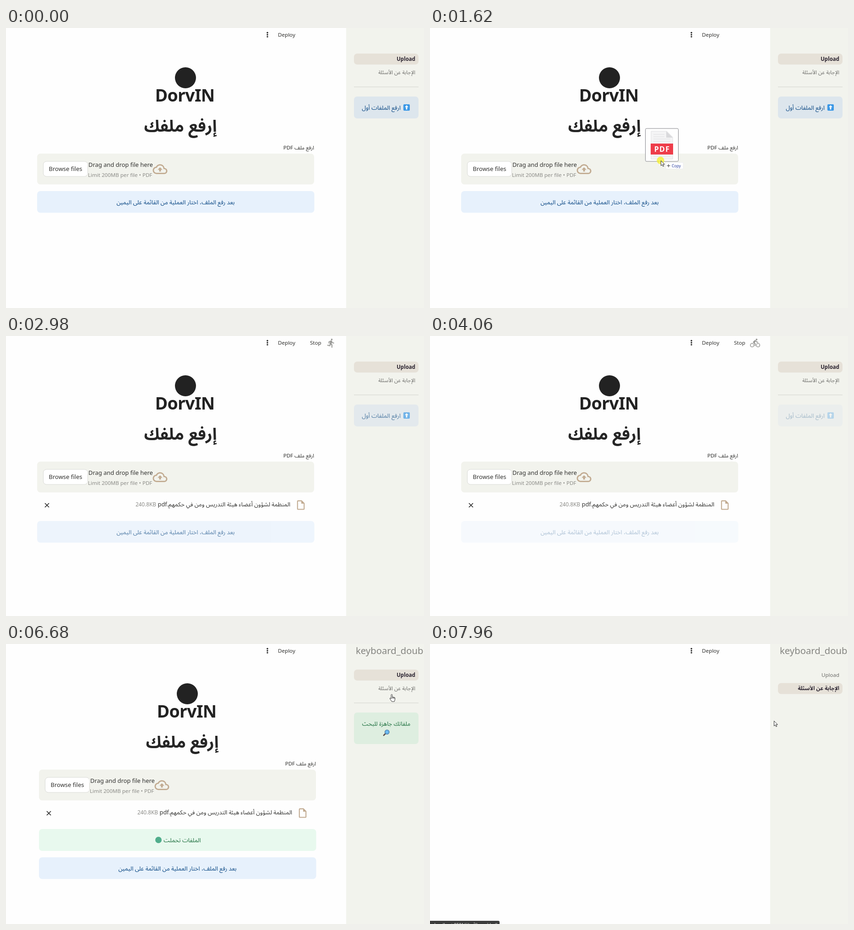
Recreate the animation shown at these times as an HTML page. Size 913 by 613 pixels, loop 8000 ms.

```html
<!DOCTYPE html>
<html lang="ar">
<head>
<meta charset="utf-8">
<title>Upload</title>
<style>
html, body { margin: 0; width: 100%; height: 100%; overflow: hidden; background: #fefefe; }
svg.stage { display: block; width: 913px; height: 613px; }
text { font-family: "Noto Sans", "Noto Sans Arabic", "Open Sans", "DejaVu Sans", sans-serif; font-size: 13px; fill: #31312f; }
.ar { direction: rtl; font-family: "Noto Sans Arabic", "Noto Sans", "DejaVu Sans", sans-serif; font-size: 12.85px; }
.mid { text-anchor: middle; }
.blue { fill: #0b4884; }
.green { fill: #1c6e3d; }
.grey { fill: #8b8b87; }
.tan { fill: #c1aa90; }

/* Every part shares one 8 s clock */
.t { animation: 8s step-end infinite; }
.drag { animation-name: drag; }
.tail { animation-name: tail; }
.page { animation-name: page; }
.file { animation-name: file; }
.info { animation-name: info; }
.stale { animation: stale 8s linear infinite; }
.run { animation-name: run; }
.walker { animation-name: walker; }
.runner { animation-name: runner; }
.biker { animation-name: biker; }
.done { animation-name: done; }
.side-old { animation-name: side-old; }
.side-new { animation-name: side-new; }
.tab-old { animation-name: tab-old; }
.tab-new { animation-name: tab-new; }
.collapse { animation-name: collapse; }
.arrow { animation-name: arrow; }
.hand { animation-name: hand; }
.status { animation-name: status; }

@keyframes drag {
  0% { visibility: hidden; transform: translate(880px, 131px); }
  13.25% { visibility: visible; transform: translate(880px, 131px); }
  14.125% { visibility: visible; transform: translate(805px, 127px); }
  15% { visibility: visible; transform: translate(728px, 134px); }
  15.875% { visibility: visible; transform: translate(680px, 145px); }
  16.75% { visibility: visible; transform: translate(635px, 160px); }
  17.625% { visibility: visible; transform: translate(588px, 187px); }
  18.5% { visibility: visible; transform: translate(557px, 222px); }
  19.375% { visibility: visible; transform: translate(526px, 260px); }
  20.25% { visibility: visible; transform: translate(504px, 290px); }
  21.125% { visibility: visible; transform: translate(496px, 304px); }
  22% { visibility: visible; transform: translate(490px, 314px); }
  22.75% { visibility: visible; transform: translate(487px, 320px); }
  23.625%, 100% { visibility: hidden; transform: translate(487px, 320px); }
}
@keyframes tail {
  0% { visibility: hidden; } 23.625% { visibility: visible; } 27.75%, 100% { visibility: hidden; }
}
@keyframes page {
  0% { visibility: visible; transform: none; }
  63.25% { visibility: visible; transform: translate(4px, 0); }
  96.125%, 100% { visibility: hidden; transform: translate(4px, 0); }
}
@keyframes file {
  0% { opacity: 0; } 23.625%, 100% { opacity: 1; }
}
@keyframes info {
  0% { transform: none; }
  23.625% { transform: translate(0, 48px); }
  63.25%, 100% { transform: translate(0, 110px); }
}
@keyframes stale {
  0% { opacity: 1; }
  27.75% { opacity: 1; animation-timing-function: ease-in; }
  43.25% { opacity: .33; animation-timing-function: step-end; }
  63.25%, 100% { opacity: 1; }
}
@keyframes run {
  0% { opacity: 0; } 27.75% { opacity: 1; } 64.125%, 100% { opacity: 0; }
}
@keyframes walker {
  0% { opacity: 1; } 30.75% { opacity: 0; } 33.25% { opacity: 1; } 35.75% { opacity: 0; }
  38.25% { opacity: 1; } 40.75% { opacity: 0; } 43.25% { opacity: 1; } 45.75% { opacity: 0; }
  48.25% { opacity: 1; } 50.75% { opacity: 0; } 55.75% { opacity: 1; } 58.25% { opacity: 0; }
  60.75%, 100% { opacity: 1; }
}
@keyframes runner {
  0% { opacity: 0; } 30.75% { opacity: 1; } 33.25% { opacity: 0; } 35.75% { opacity: 1; }
  38.25% { opacity: 0; } 40.75% { opacity: 1; } 43.25% { opacity: 0; } 45.75% { opacity: 1; }
  48.25% { opacity: 0; } 53.25% { opacity: 1; } 55.75% { opacity: 0; } 58.25% { opacity: 1; }
  60.75%, 100% { opacity: 0; }
}
@keyframes biker {
  0% { opacity: 0; } 50.75% { opacity: 1; } 53.25%, 100% { opacity: 0; }
}
@keyframes done {
  0% { opacity: 0; } 63.25%, 100% { opacity: 1; }
}
@keyframes side-old {
  0% { visibility: visible; } 63.25%, 100% { visibility: hidden; }
}
@keyframes side-new {
  0% { visibility: hidden; } 63.25% { visibility: visible; } 96.125%, 100% { visibility: hidden; }
}
@keyframes tab-old {
  0% { visibility: visible; } 96.125%, 100% { visibility: hidden; }
}
@keyframes tab-new {
  0% { visibility: hidden; } 96.125%, 100% { visibility: visible; }
}
@keyframes collapse {
  0% { visibility: hidden; } 75%, 100% { visibility: visible; }
}
@keyframes arrow {
  0% { visibility: hidden; transform: translate(904px, 10px); }
  75% { visibility: visible; transform: translate(904px, 10px); }
  75.875% { visibility: visible; transform: translate(895px, 36px); }
  76.75% { visibility: visible; transform: translate(885px, 58px); }
  77.625% { visibility: visible; transform: translate(876px, 74px); }
  78.5% { visibility: visible; transform: translate(868px, 84px); }
  81.75% { visibility: hidden; transform: translate(868px, 84px); }
  99.5%, 100% { visibility: visible; transform: translate(751px, 168px); }
}
@keyframes hand {
  0% { visibility: hidden; transform: translate(857px, 97px); }
  81.75% { visibility: visible; transform: translate(857px, 97px); }
  82.625% { visibility: visible; transform: translate(848px, 104px); }
  83.5% { visibility: visible; transform: translate(842px, 110px); }
  87.625% { visibility: visible; transform: translate(843px, 107px); }
  88.625% { visibility: visible; transform: translate(845px, 104px); }
  89.625% { visibility: visible; transform: translate(847px, 101px); }
  90.75% { visibility: visible; transform: translate(849px, 98px); }
  91.75% { visibility: visible; transform: translate(850px, 95px); }
  92.75% { visibility: visible; transform: translate(851px, 93px); }
  99.5%, 100% { visibility: hidden; transform: translate(851px, 93px); }
}
@keyframes status {
  0% { visibility: hidden; } 90.75%, 100% { visibility: visible; }
}
</style>
</head>
<body>
<svg class="stage" viewBox="0 0 913 613">
  <defs>
    <path id="pointer" d="M.5.5v11l2.6-2.4 1.8 4 1.8-.8-1.8-3.9h3.4z" fill="#fff" stroke="#333" stroke-width="1" stroke-linejoin="round"/>
  </defs>

  <rect width="913" height="613" fill="#fefefe"/>
  <rect x="743" width="170" height="613" fill="#f2f3ed"/>

  <!-- Toolbar -->
  <g fill="#262626"><circle cx="571" cy="10.3" r="1.7"/><circle cx="571" cy="14.7" r="1.7"/><circle cx="571" cy="19.1" r="1.7"/></g>
  <text x="594" y="19" style="font-size:11.6px">Deploy</text>
  <g class="t run">
    <text x="664" y="19" style="font-size:11.6px">Stop</text>
    <g transform="translate(699 4.4) scale(.92)" fill="#92928f">
      <path class="t walker" d="M13.5 5.5a2 2 0 1 0 0-4 2 2 0 0 0 0 4zM9.8 8.9L7 23h2.1l1.8-8 2.1 2v6h2v-7.5l-2.1-2 .6-3c1.3 1.5 3.3 2.5 5.5 2.5v-2c-1.9 0-3.5-1-4.3-2.4l-1-1.6c-.8-1.2-1.7-1.2-2.5-.9L6 8.3V13h2V9.6z"/>
      <path class="t runner" d="M13.5 5.5a2 2 0 1 0 0-4 2 2 0 0 0 0 4zM9.9 19.4l1-4.4 2.1 2v6h2v-7.5l-2.1-2 .6-3c1.3 1.5 3.3 2.5 5.5 2.5v-2c-1.9 0-3.5-1-4.3-2.4l-1-1.6c-.8-1.2-1.7-1.2-2.5-.9L6 8.3V13h2V9.6l1.8-.7-1.6 8.1-4.9-1-.4 2z"/>
      <g class="t biker">
        <circle cx="15.5" cy="3.5" r="2"/>
        <g fill="none" stroke="#92928f" stroke-width="1.6"><circle cx="5" cy="17" r="4.2"/><circle cx="19" cy="17" r="4.2"/></g>
        <path d="M10.8 10.5l2.4-2.4.8.8c1.3 1.3 3 2.1 5.1 2.1V9c-1.5 0-2.7-.6-3.6-1.5l-1.9-1.9c-1-.8-2.2-.8-3 0L7.8 8.4c-.8.8-.8 2 0 2.8L11 14v5h2v-6.2z"/>
      </g>
    </g>
  </g>

  <!-- Upload page -->
  <g class="t page">
    <circle cx="392" cy="109" r="23" fill="#222"/>
    <text class="mid" x="390.5" y="160.5" style="font-size:37.5px;font-weight:600;letter-spacing:-.7px;fill:#222">DorvIN</text>
    <text class="ar mid" x="381" y="227" style="font-size:36px;font-weight:600;fill:#262626">إرفع ملفك</text>
    <text class="ar" x="673" y="265.5" style="font-size:11.5px">ارفع ملف PDF</text>

    <rect x="68" y="275" width="605" height="67.5" rx="7" fill="#f2f3ed"/>
    <rect x="81.5" y="292" width="97" height="33" rx="7" fill="#fff" stroke="#d9dad6"/>
    <text class="mid" x="130" y="313">Browse files</text>
    <text x="180" y="304" style="font-size:12.9px">Drag and drop file here</text>
    <text class="grey" x="179" y="326" style="font-size:11.55px">Limit 200MB per file • PDF</text>
    <path class="tan" transform="translate(320.5 293) scale(1.333)" d="M19.35 10.04C18.67 6.59 15.64 4 12 4 9.11 4 6.6 5.64 5.35 8.04 2.34 8.36 0 10.91 0 14c0 3.31 2.69 6 6 6h13c2.76 0 5-2.24 5-5 0-2.64-2.05-4.78-4.65-4.96zM19 18H6a4 4 0 0 1-.44-7.97l1.07-.11.5-.95A5.5 5.5 0 0 1 17.39 10.43l.3 1.5 1.53.11A3 3 0 0 1 19 18zM8 13h2.55v3h2.9v-3H16l-4-4z"/>

    <g class="t file">
      <path class="tan" transform="translate(631.6 357.8) scale(1.03)" d="M14 2H6a2 2 0 0 0-2 2v16a2 2 0 0 0 2 2h12a2 2 0 0 0 2-2V8zM6 20V4h7v5h5v11z"/>
      <text class="ar" x="621" y="373" style="font-size:12.75px">المنظمة لشؤون أعضاء هيئة التدريس ومن في حكمهم.pdf</text>
      <text class="grey" x="328" y="373" text-anchor="end" style="font-size:11.8px">240.8KB</text>
      <path d="M85 366l9 9m0-9l-9 9" stroke="#262626" stroke-width="1.6"/>
    </g>

    <g class="t done">
      <rect x="68" y="405" width="605.5" height="48" rx="7" fill="#e8f9ee"/>
      <circle cx="329" cy="429" r="7" fill="#50ae8c"/>
      <text class="ar green" x="421.5" y="434">الملفات تحملت</text>
    </g>

    <g class="t info"><g class="stale">
      <rect x="68" y="357" width="605.5" height="47.5" rx="7" fill="#e7f1fc"/>
      <text class="ar blue mid" x="370.5" y="385.5">بعد رفع الملف، اختار العملية من القائمة على اليمين</text>
    </g></g>
  </g>

  <!-- Sidebar -->
  <g class="t tab-old">
    <rect x="760" y="56" width="141" height="24" rx="7" fill="#e6e1d8"/>
    <text x="894" y="72" text-anchor="end" style="font-size:11.5px;font-weight:600;fill:#2b2430">Upload</text>
    <text class="ar" x="894" y="101" style="font-size:11.65px;fill:#6c6c69">الإجابة عن الأسئلة</text>
    <path d="M760 129h141" stroke="#d2d3cd"/>
  </g>
  <g class="t tab-new">
    <text x="894" y="72" text-anchor="end" style="font-size:11.5px;fill:#6c6c69">Upload</text>
    <rect x="760" y="85.5" width="141" height="24" rx="7" fill="#e6e1d8"/>
    <text class="ar" x="894" y="101" style="font-size:11.65px;font-weight:600;fill:#2b2430">الإجابة عن الأسئلة</text>
  </g>
  <g class="t side-old"><g class="stale">
    <rect x="760" y="150" width="141" height="48" rx="7" fill="#dde6ed"/>
    <text class="ar blue" x="862" y="178.5">ارفع الملفات أول</text>
    <rect x="868" y="167" width="14" height="14" rx="2" fill="#3b98e6"/>
    <path d="M875 169l4 4.2h-2.6v5.3h-2.8v-5.3H871z" fill="#fff"/>
  </g></g>
  <g class="t side-new">
    <rect x="760" y="150" width="141" height="69" rx="7" fill="#deeee0"/>
    <text class="ar green mid" x="830.5" y="178.5">ملفاتك جاهزة للبحث</text>
    <path d="M829 196l-4 4" stroke="#5b4a48" stroke-width="2.6" stroke-linecap="round"/>
    <circle cx="832.3" cy="192.7" r="4.6" fill="#6bb9f0" stroke="#4678a4" stroke-width="1.4"/>
  </g>
  <text class="t collapse" x="764" y="22" style="font-size:20.3px;fill:#858581">keyboard_double_arrow_left</text>

  <!-- Status bubble, mostly below the edge -->
  <g class="t status">
    <path d="M0 606h149q3 0 3 3v4H0z" fill="#3b3c3b"/>
    <text class="ar" x="147" y="618" style="font-size:9.5px;fill:#fff">الإجابة_عن_الأسئلة/localhost:8501</text>
  </g>

  <!-- Pointers; origin is the hot spot -->
  <g class="t drag">
    <rect x="-33.5" y="-70" width="72" height="72" rx="2.5" fill="#fefefe" stroke="#85858a"/>
    <path d="M-21-64h34l13 13v48h-47z" fill="#f4f4f5" stroke="#e0e0e2"/>
    <path d="M12-64l14 14H12z" fill="#d9d9dc"/>
    <path d="M-16-57H8m-24 5H8m-24 5h37m-37 5h37m-37 33h37" stroke="#dedee1"/>
    <rect x="-22" y="-37" width="49" height="24" fill="#ee3d4a"/>
    <text class="mid" x="3" y="-19.3" style="font-size:16px;font-weight:600;letter-spacing:1.3px;fill:#fff">PDF</text>
    <circle cx="-.5" cy="0" r="8.2" fill="#f4ef35" opacity=".8"/>
    <rect x="11" y="4.5" width="38" height="14" rx="2" fill="#fff" stroke="#ececf0"/>
    <path d="M13.5 11.5h7m-3.5-3.5v7" stroke="#333"/>
    <text x="24" y="14.7" style="font-size:8.5px;fill:#2c3fa0">Copy</text>
    <use href="#pointer"/>
  </g>
  <path class="t tail" d="M489 325.5l3.5 1.5 2 4m-5-5l1.5 4.5 2-1.5m1-3h3l-2 3" fill="none" stroke="#555" stroke-width=".9"/>
  <use class="t arrow" href="#pointer"/>
  <path class="t hand" d="M-.8 10V1.6a1.3 1.3 0 0 1 2.6 0V6l4.2.8q2 .4 1.8 2.4l-.6 4-1 2.8H.7L-3.4 10q-.8-1.5.6-1.8 1-.1 2 1.8zM1.8 6v3.5M4 6.5v3M6 7v2.7" fill="#fff" stroke="#333" stroke-width="1" stroke-linejoin="round"/>
</svg>
</body>
</html>
```
